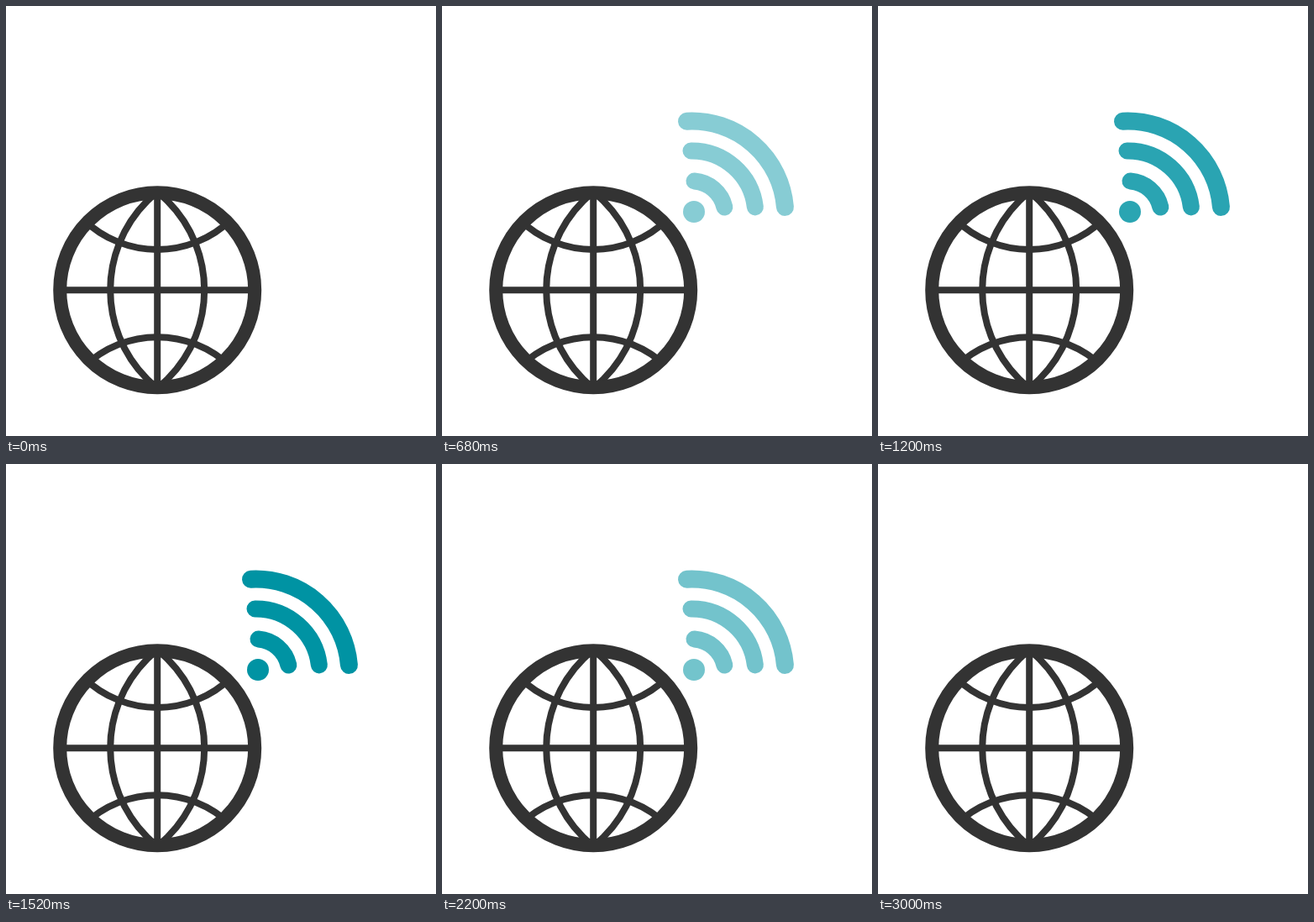
Recreate the animation shown at these times as an HTML page with a canvas. Size 512 by 512 pixels, loop 3.04 s.

```html
<!DOCTYPE html>
<html lang="en">
<head>
<meta charset="utf-8">
<title>Globe with signal</title>
<style>
  html, body { margin: 0; width: 100%; height: 100%; overflow: hidden; background: #fff; }
  canvas { display: block; width: 512px; height: 512px; }
</style>
</head>
<body>
<canvas id="stage" width="512" height="512"></canvas>
<script>
const ctx = document.getElementById('stage').getContext('2d');
const LOOP = 3040, STEP = 40;
const INK = '#333333', TEAL = '#0093a3';

function arc(cx, cy, r, from, to) {
  ctx.beginPath();
  ctx.arc(cx, cy, r, from, to);
  ctx.stroke();
}

function line(x1, y1, x2, y2) {
  ctx.beginPath();
  ctx.moveTo(x1, y1);
  ctx.lineTo(x2, y2);
  ctx.stroke();
}

function drawGlobe() {
  const x = 180.2, y = 338.2, full = Math.PI * 2;
  ctx.strokeStyle = INK;
  ctx.lineCap = 'butt';
  ctx.lineWidth = 8;

  ctx.save();
  ctx.beginPath();
  ctx.arc(x, y, 116, 0, full);
  ctx.clip();
  line(x, y - 116, x, y + 116);
  line(x - 116, y, x + 116, y);
  // meridians, then parallels
  arc(x + 94, y, 150, 0, full);
  arc(x - 94, y, 150, 0, full);
  arc(x, 164, 126, 0, full);
  arc(x, 520.2, 126, 0, full);
  ctx.restore();

  ctx.lineWidth = 16;
  arc(x, y, 116, 0, full);
}

function drawSignal(alpha) {
  const x = 297.4, y = 248.4;
  ctx.globalAlpha = alpha;
  ctx.strokeStyle = ctx.fillStyle = TEAL;
  ctx.lineCap = 'round';
  for (const [r, startX, width] of [[40, 300.5, 20], [76, 296.5, 20], [111.4, 291.5, 21]]) {
    ctx.lineWidth = width;
    arc(x, y, r, -Math.acos((startX - x) / r), -Math.asin(9 / r));
  }
  ctx.beginPath();
  ctx.arc(300, 245, 13, 0, Math.PI * 2);
  ctx.fill();
  ctx.globalAlpha = 1;
}

// Linear fade in, short hold, linear fade out
function strength(t) {
  return Math.max(0, Math.min(1, t / 1440, (3000 - t) / 1460));
}

function frame(now) {
  const t = Math.floor((now % LOOP) / STEP) * STEP;
  ctx.fillStyle = '#fff';
  ctx.fillRect(0, 0, 512, 512);
  drawGlobe();
  drawSignal(strength(t));
  requestAnimationFrame(frame);
}

frame(performance.now());
</script>
</body>
</html>
```
